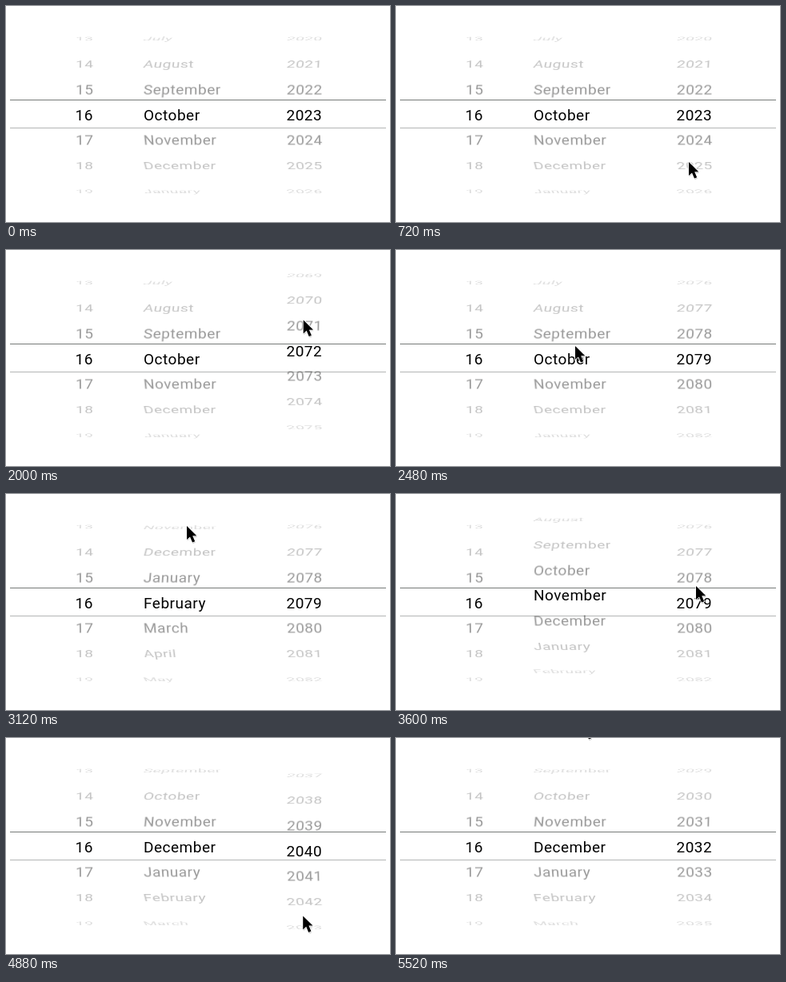
An HTML page for the animation above (6120 ms loop, 480 px wide and 270 px high).

```html
<!DOCTYPE html>
<html lang="en">
<head>
<meta charset="utf-8">
<title>Date picker</title>
<style>
  html, body { margin: 0; width: 100%; height: 100%; overflow: hidden; background: #fff; }
  #stage { position: relative; width: 480px; height: 270px; overflow: hidden; }
  .row { position: absolute; font: 19px/32px Roboto, sans-serif; letter-spacing: .5px; white-space: pre; }
  .line { position: absolute; left: 5px; width: 470px; height: 1px; }
  svg { position: absolute; left: 0; top: 0; overflow: visible; }
</style>
</head>
<body>
<div id="stage">
  <div class="line" style="top:117px;background:#757a78"></div>
  <div class="line" style="top:152px;background:#b4b6b5"></div>
  <svg width="1" height="1" style="z-index:1">
    <defs><path id="arrow" d="M0 0V17L4 13.4L7 20.5L10.2 19.2L7.2 12.2H12.3Z"/></defs>
    <g id="pointer">
      <use href="#arrow" x=".6" y="1.6" fill="#0004"/>
      <use href="#arrow" stroke="#fff" stroke-width="1.6" paint-order="stroke"/>
    </g>
  </svg>
</div>
<script>
const LOOP = 6120, STEP = 31.7, CENTER = 136.5, TILT = 23, REACH = 4, FRICTION = 2.4;
const MONTHS = ['January', 'February', 'March', 'April', 'May', 'June', 'July',
  'August', 'September', 'October', 'November', 'December'];
const stage = document.getElementById('stage');
const pointer = document.getElementById('pointer');
const clamp = u => Math.min(1, Math.max(0, u));
const opacity = distance => distance ? .4 * .58 ** (distance - 1) : 1;

// A wheel starts at a value; each flick [start, end, rows] spins it until friction stops it
const wheels = [
  { x: 86.5, pivot: 11, value: 16, label: String, flicks: [] },
  { x: 172, pivot: 75, value: 9, label: i => MONTHS[i % 12], flicks: [[3013, 3840, 14]] },
  { x: 350.5, pivot: 60, value: 2023, label: String,
    flicks: [[750, 1560, 44], [1880, 2440, 12], [3880, 4668, -30], [4668, 5440, -17]] }];

for (const wheel of wheels) {
  wheel.rows = [];
  for (let k = -REACH; k <= REACH; k++) {
    const el = document.createElement('div');
    el.className = 'row';
    el.style.left = wheel.x + 'px';
    el.style.opacity = opacity(Math.abs(k));
    el.style.transformOrigin = wheel.pivot + 'px 50%';
    if (k) el.style.transform = `perspective(300px) rotateX(${-k * TILT}deg)`;
    stage.append(el);
    wheel.rows.push({ el, k });
  }
}

function drawWheel({ value, flicks, rows, label }, t) {
  const position = flicks.reduce((sum, [start, end, count]) =>
    sum + count * (1 - (1 - clamp((t - start) / (end - start))) ** FRICTION), value);
  const nearest = Math.round(position);
  for (const { el, k } of rows) {
    el.textContent = label(nearest + k);
    el.style.top = CENTER - 16 + (nearest + k - position) * STEP + 'px';
  }
}

// Pointer strokes as key points [time, x, y]; hidden between strokes
const strokes = [
  [[60, 137, 131], [560, 378, 213], [720, 366, 195], [1000, 101, 4]],
  [[1320, 230, 150], [1560, 263, 173], [1860, 384, 215], [2040, 370, 70], [2480, 224, 120],
    [2960, 220, 205], [3120, 226, 40], [3600, 375, 115], [3980, 372, 215], [4160, 105, 225]],
  [[4560, 366, 40], [4800, 372, 225], [5160, 366, 205], [5520, 234, -19], [LOOP, 234, -19]]];

function drawPointer(t) {
  const stroke = strokes.find(s => t >= s[0][0] && t <= s.at(-1)[0]);
  pointer.style.display = stroke ? '' : 'none';
  if (!stroke) return;
  const next = Math.max(1, stroke.findIndex(([time]) => time >= t));
  const [t0, x0, y0] = stroke[next - 1], [t1, x1, y1] = stroke[next];
  const u = (t - t0) / (t1 - t0), ease = u * u * (3 - 2 * u);
  pointer.setAttribute('transform', `translate(${x0 + (x1 - x0) * ease} ${y0 + (y1 - y0) * ease})`);
}

const begin = performance.now();
(function frame() {
  const t = Math.max(0, performance.now() - begin) % LOOP;
  for (const wheel of wheels) drawWheel(wheel, t);
  drawPointer(t);
  requestAnimationFrame(frame);
})();
</script>
</body>
</html>
```
